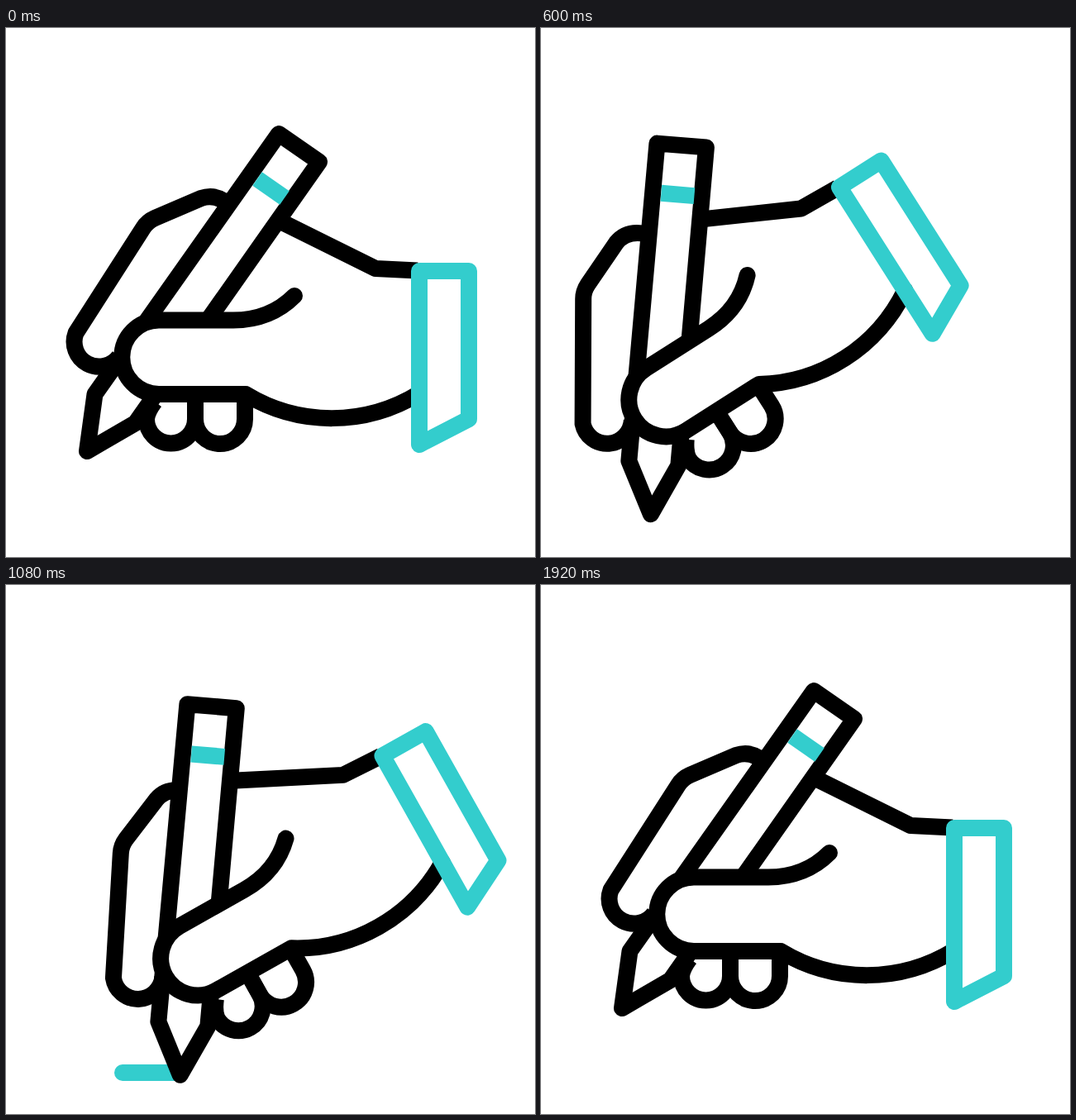
Recreate the animation shown at these times as an HTML page. Size 640 px wide and 640 px high, loop 2 s.

```html
<!DOCTYPE html>
<html lang="en">
<head>
<meta charset="utf-8">
<title>Writing hand</title>
<style>
  html, body { margin: 0; width: 100%; height: 100%; overflow: hidden; background: #fff; }
  svg { display: block; width: 100%; height: 100%; }
  path { fill: none; stroke: #000; stroke-width: 20; stroke-linecap: round; stroke-linejoin: round; }
  .teal { stroke: #33cdcd; }
  .flat { stroke-linecap: butt; }
  .solid { fill: #fff; }
  .bare { stroke: none; }
</style>
</head>
<body>
<svg viewBox="0 0 640 640">
  <path id="ink" class="teal"/>
  <g class="hand">
    <!-- index finger, back of the hand, lower fingers -->
    <path class="flat" d="M274 218Q256 199 236 206L180 230Q171 234 166 242L84.500 369A30 30 0 0 0 137 397"/>
    <path class="flat" d="M322 229L447 291L498 293.500"/>
    <path class="flat" d="M289 445V473A30 30 0 0 1 229 473V445"/>
    <path class="flat" d="M229 445V473A29.500 29.500 0 0 1 170 473Q171 464 180 452"/>
  </g>
  <g class="pencil">
    <path class="solid" d="M98 512L107.500 443L330 128L379 162L156.500 478Z"/>
    <path class="teal flat" d="M304 182.500L337 205.500"/>
  </g>
  <g class="hand">
    <!-- thumb, palm, cuff -->
    <path class="solid bare" d="M275 353.500H185A44.700 44.700 0 0 0 185 443H290Z"/>
    <path d="M349 324C329 344 303 353.500 275 353.500H185A44.700 44.700 0 0 0 185 443H290C354 482 435 482 500 442"/>
    <path class="teal" d="M500 294H560V473L500 504Z"/>
  </g>
</svg>
<script>
  const LOOP = 2000, STEP = 40, MID = 320;
  const TIP = { x: 98 - MID, y: 512 - MID };
  const LINE = { from: 141, to: 272, y: 590 };

  // Poses are [x, y, degrees]; sway is added at the middle of the line.
  const REST = [0, 0, 0];
  const parts = {
    hand: { left: [-110, -10, -36.8], right: [22.2, -6.3, -37], sway: [9.5, 5.9, 9.5] },
    pencil: { left: [-104, -10.6, -34.2], right: [28, -7, -34.2], sway: [-3.4, 4.4, 5.2] }
  };

  const ink = document.getElementById('ink');
  const clamp = (v, lo, hi) => Math.min(hi, Math.max(lo, v));
  const mix = (a, b, k) => a.map((v, i) => v + (b[i] - v) * k);
  const ease = (t, start, end) => {
    const u = clamp((t - start) / (end - start), 0, 1);
    return u * u * (3 - 2 * u);
  };

  // Reach for the line, draw it, then go back.
  function poseAt(part, t) {
    if (t < 720) return mix(REST, part.left, ease(t, 160, 720));
    if (t >= 1360) return mix(part.right, REST, ease(t, 1360, 1920));
    const bend = ease(t, 720, 1000) - ease(t, 1000, 1280);
    return mix(part.left, part.right, ease(t, 720, 1280))
      .map((v, i) => v + part.sway[i] * bend);
  }

  function place(name, t) {
    const pose = poseAt(parts[name], t);
    const [x, y, deg] = pose;
    for (const g of document.querySelectorAll('.' + name)) {
      g.setAttribute('transform',
        `translate(${MID + x} ${MID + y}) rotate(${deg}) translate(${-MID} ${-MID})`);
    }
    return pose;
  }

  function drawLine(t, tipX) {
    const x = t < 1280 ? clamp(tipX, LINE.from, LINE.to) : LINE.to;
    ink.setAttribute('d', `M${LINE.from} ${LINE.y}H${x + 0.01}`);
    ink.setAttribute('opacity', t < 720 ? 0 : 1 - ease(t, 1320, 1840));
  }

  function render(t) {
    place('hand', t);
    const [x, , deg] = place('pencil', t);
    const r = deg * Math.PI / 180;
    drawLine(t, MID + x + TIP.x * Math.cos(r) - TIP.y * Math.sin(r));
  }

  const begin = performance.now();
  function tick() {
    const t = (performance.now() - begin) % LOOP;
    render(Math.floor(t / STEP) * STEP);
    requestAnimationFrame(tick);
  }
  tick();
</script>
</body>
</html>
```
